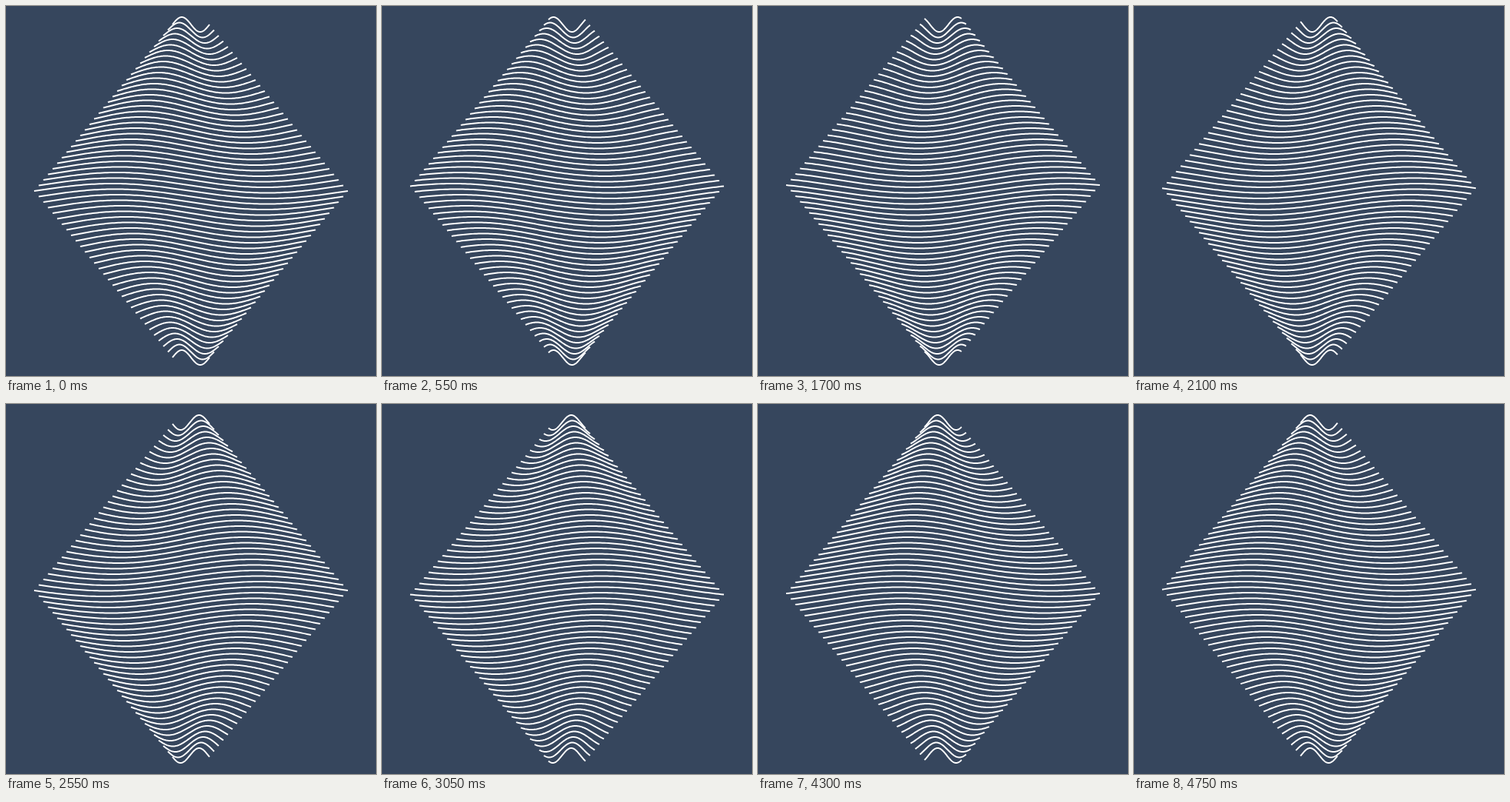
These frames come from a looping animation (500 by 500 pixels, 4800 ms). An HTML page with a canvas:

```html
<!DOCTYPE html>
<html lang="en">
<head>
<meta charset="utf-8">
<title>Wave diamond</title>
<style>
html, body { margin: 0; height: 100%; overflow: hidden; background: #36465d; }
canvas { display: block; }
</style>
</head>
<body>
<canvas id="stage" width="500" height="500"></canvas>
<script>
const ctx = document.getElementById('stage').getContext('2d');
const SIZE = 500, CENTER = SIZE / 2;
const LOOP = 4800, STEP = 50;
const HALF_LINES = 30, GAP = 7.5, AMPLITUDE = 10;
const MIN_HALF = 25, MAX_HALF = 212, SEGMENTS = 120;

// One full wave period spans each line, whatever its length.
function wave(row, phase) {
  const half = MAX_HALF - (MAX_HALF - MIN_HALF) * Math.abs(row) / HALF_LINES;
  const baseY = CENTER + row * GAP;
  ctx.beginPath();
  for (let i = 0; i <= SEGMENTS; i++) {
    const u = i / SEGMENTS;
    ctx.lineTo(CENTER + half * (2 * u - 1),
               baseY - AMPLITUDE * Math.sin(2 * Math.PI * (u + phase)));
  }
  ctx.stroke();
}

function draw(time) {
  const phase = Math.floor(time % LOOP / STEP) * STEP / LOOP;
  ctx.fillStyle = '#36465d';
  ctx.fillRect(0, 0, SIZE, SIZE);
  ctx.strokeStyle = '#fff';
  ctx.lineWidth = 2;
  ctx.lineJoin = 'round';
  for (let row = -HALF_LINES; row <= HALF_LINES; row++) wave(row, phase);
}

const start = performance.now();
function tick() {
  draw(performance.now() - start);
  requestAnimationFrame(tick);
}
tick();
</script>
</body>
</html>
```
